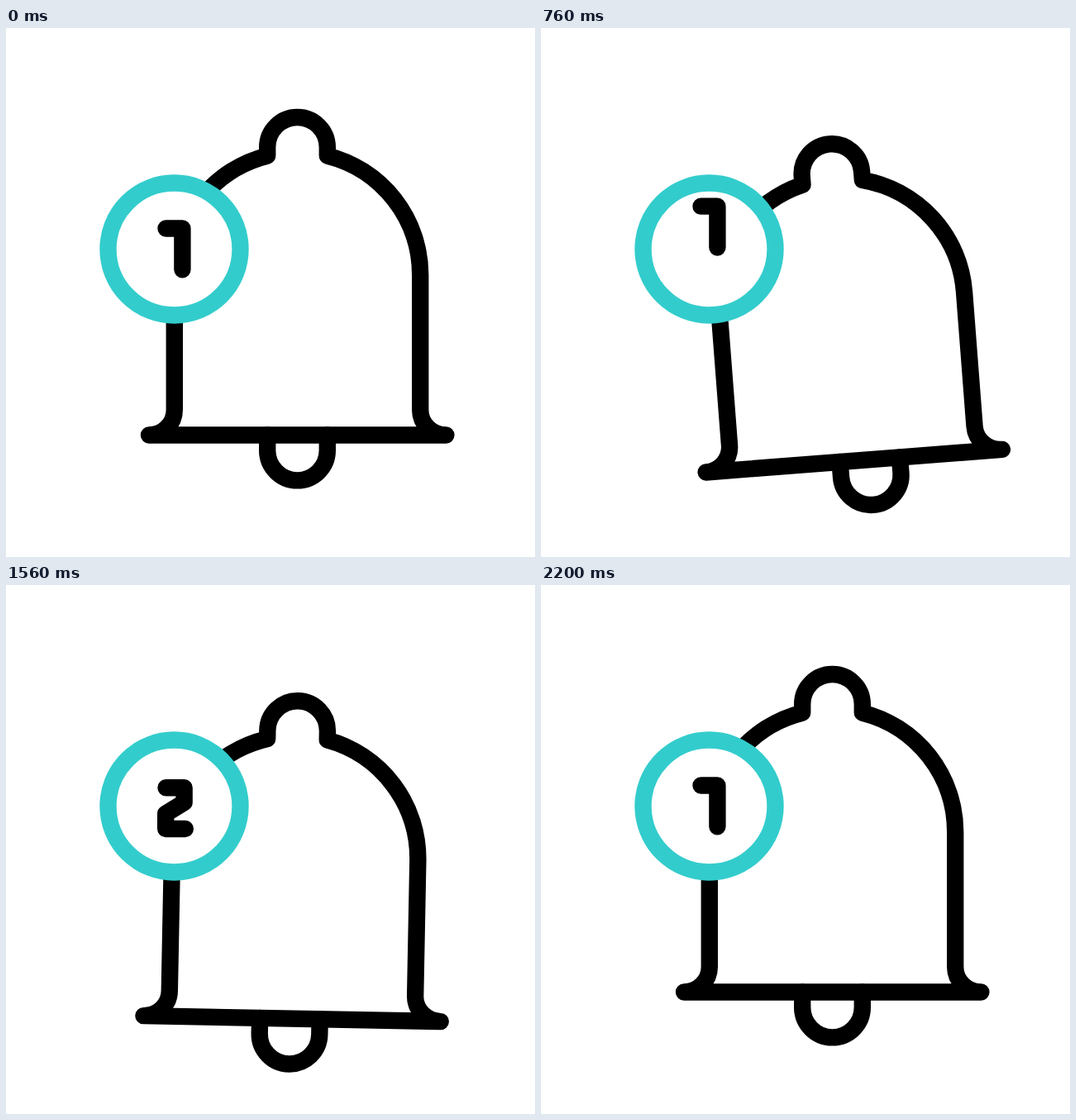
Recreate the animation shown at these times as an HTML page. Size 640 px wide and 640 px high, loop 2.4 s.

```html
<!DOCTYPE html>
<html lang="en">
<head>
<meta charset="utf-8">
<title>Notification bell</title>
<style>
  html, body { margin: 0; width: 100%; height: 100%; overflow: hidden; background: #fff; }
  svg { display: block; width: 100%; height: 100%; }
  .line { fill: none; stroke: #000; stroke-width: 20.4; stroke-linecap: round; stroke-linejoin: round; }
</style>
</head>
<body>
<svg viewBox="0 0 640 640">
  <defs>
    <clipPath id="hole"><circle cx="203.5" cy="267.5" r="75"/></clipPath>
  </defs>
  <g id="bell" class="line">
    <path d="M173 492.5A30.8 30.5 0 0 0 203.8 462V298.7A148.7 148.7 0 0 1 316.2 154.6V144.3
             A36.3 36.3 0 0 1 388.8 144.3V154.6A148.7 148.7 0 0 1 501.2 298.7V462A31.2 30.5 0 0 0 532.4 492.5Z"/>
    <path id="clapper" d="M316.2 492.5V511.1A36.3 36.3 0 0 0 388.8 511.1V492.5"/>
  </g>
  <circle cx="203.5" cy="267.5" r="80" fill="#fff"/>
  <g clip-path="url(#hole)" class="line">
    <path id="one" d="M193.5 242.5H213.4V292.3"/>
    <path id="two" d="M193.5 245.3H215.6V263L193.2 276.8V295H216.8"/>
  </g>
  <circle cx="203.5" cy="267.5" r="80" fill="none" stroke="#33cccc" stroke-width="20.4"/>
</svg>
<script>
  const LOOP = 2400, STEP = 20;
  const DROP = 32.2, GAP = 153;
  const PIVOT = "352.5 152";

  // Turning points of the ringing, shared by bell (degrees) and clapper (pixels).
  const turns = [600, 900, 1200, 1440, 1660, 1880];
  const tilts = [0, 8, -8, 4, -5, 0];
  const slides = [0, 35, -28, 31, -28, 0];

  // Smooth rise from 0 to 1 between two times.
  function ramp(t, from, to) {
    const u = Math.min(1, Math.max(0, (t - from) / (to - from)));
    return u * u * (3 - 2 * u);
  }

  // Goes out and comes back again.
  const trip = (t, out, arrive, leave, home) => ramp(t, out, arrive) - ramp(t, leave, home);

  // Adds up the eased steps from each turning point to the next.
  const ring = (t, values) => values.reduce((sum, value, i) =>
    i ? sum + (value - values[i - 1]) * ramp(t, turns[i - 1], turns[i]) : value, 0);

  function move(id, transform) {
    document.getElementById(id).setAttribute("transform", transform);
  }

  function draw(t) {
    const fall = DROP * trip(t, 200, 600, 1800, 2200);
    const scroll = GAP * trip(t, 600, 1200, 1656, 2200);
    move("bell", `translate(0 ${fall}) rotate(${-ring(t, tilts)} ${PIVOT})`);
    move("clapper", `translate(${ring(t, slides)} 0)`);
    move("one", `translate(0 ${-scroll})`);
    move("two", `translate(0 ${GAP - scroll})`);
  }

  const start = performance.now();
  function tick() {
    const t = (performance.now() - start) % LOOP;
    draw(Math.floor(t / STEP) * STEP);
    requestAnimationFrame(tick);
  }
  draw(0);
  requestAnimationFrame(tick);
</script>
</body>
</html>
```
